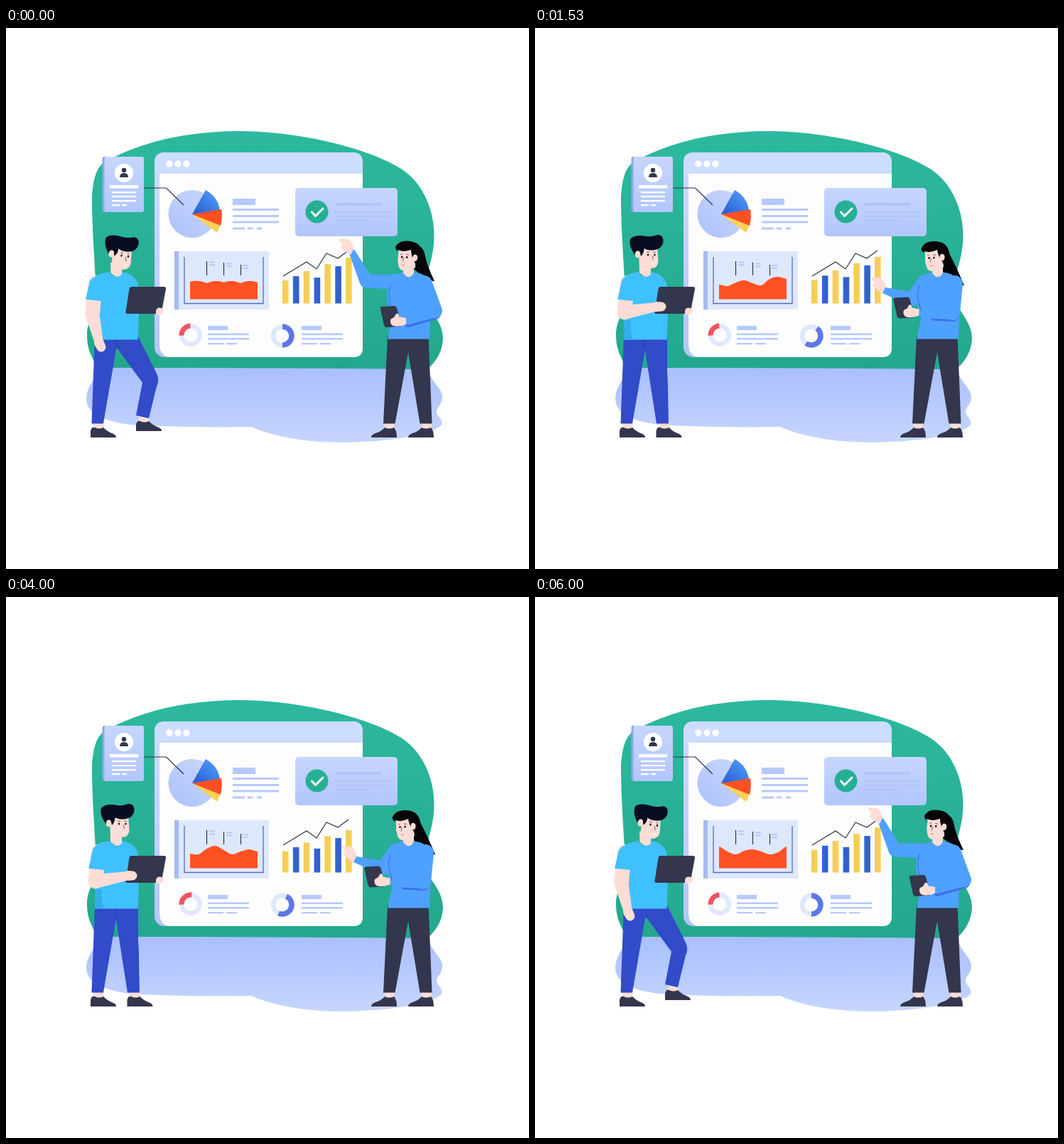
Recreate the animation shown at these times as an HTML page. Size 736 by 761 pixels, loop 6.03 s.

```html
<!DOCTYPE html>
<html lang="en">
<head>
<meta charset="utf-8">
<title>Dashboard presentation</title>
<style>
html, body { margin: 0; width: 100%; height: 100%; overflow: hidden; background: #fff; }
svg { display: block; width: 100%; height: 100%; }
.skin { fill: #fdddd6; }
.dark { fill: #33364c; }
.hair { fill: #080c20; }
.black { fill: #050507; }
.tee { fill: #40c1ff; }
.top { fill: #4fa1ff; }
.shade { fill: #3c72ee; }
.jeans { fill: #314bc9; }
.text { fill: #b7c9fd; }
.ink { fill: none; stroke: #2f3248; stroke-width: 1.2; }
.fine { fill: none; stroke: #2f3248; stroke-width: .7; }
</style>
</head>
<body>
<svg viewBox="0 0 736 761" xmlns="http://www.w3.org/2000/svg">
<defs>
  <linearGradient id="green" x2="0" y2="1"><stop stop-color="#2db99e"/><stop offset="1" stop-color="#23a88d"/></linearGradient>
  <linearGradient id="floor" x2="0" y2="1"><stop stop-color="#a9bffd"/><stop offset="1" stop-color="#c6d6ff"/></linearGradient>
  <linearGradient id="card" x2="0" y2="1"><stop stop-color="#c6d6ff"/><stop offset="1" stop-color="#b2c6fc"/></linearGradient>
  <linearGradient id="pie" y1="1" x2="1" y2="0"><stop stop-color="#acc1fa"/><stop offset="1" stop-color="#c9d8ff"/></linearGradient>
  <linearGradient id="wedge" x1="1" x2="0" y2="1"><stop stop-color="#55a6ff"/><stop offset="1" stop-color="#2558cf"/></linearGradient>
  <linearGradient id="gold" x2="1" y2="0"><stop stop-color="#f5cb52"/><stop offset="1" stop-color="#f7d25e"/></linearGradient>
  <linearGradient id="blue" x2="1" y2="0"><stop stop-color="#3465d4"/><stop offset="1" stop-color="#2f5ecb"/></linearGradient>
  <linearGradient id="side" x2="0" y2="1"><stop stop-color="#cdddff"/><stop offset="1" stop-color="#b3c6f8"/></linearGradient>
  <path id="shoe" d="M119 576V567Q120 561 125 562Q131 565 137 562Q143 568 150 570.500Q155 572 155 576Z"/>
  <path id="pump" d="M514 576Q514 572 520 570Q529 567 533 562Q539 565 546 562Q550 566 550 576Z"/>
</defs>

<path fill="url(#green)" d="M121 240C122 212 128 194 140 188C190 160 255 145 330 145C412 146 505 167 556 198C590 220 602.500 260 602.500 292C602.500 325 591 340 590 372C590 396 614 408 615 436C614 458 604 470 592 481H130C122 464 114 454 114 432C114 410 126 402 127 380C126 340 121 290 121 240Z"/>
<path fill="url(#floor)" d="M130 478Q360 477.500 594 480C599 500 614 506 614 520C613 532 605 534 606 541C608 548 615 550 613 558C604 571 540 583 470 583C420 582 380 576 345 561C290 562 220 561 175 558C145 554 113 546 113 521C114 502 126 496 130 478Z"/>

<rect x="209" y="175" width="293" height="288" rx="14" fill="url(#side)"/>
<path fill="#fdfdfe" d="M216 190H502V450Q502 463 489 463H230Q216 461 216 444Z"/>
<path fill="#cdddff" d="M209 205V189Q209 175 223 175H488Q502 175 502 189V205Z"/>
<g fill="#fff"><circle cx="230" cy="191" r="4.7"/><circle cx="242" cy="191" r="4.7"/><circle cx="254" cy="191" r="4.7"/></g>

<rect x="135.500" y="181" width="20" height="78" rx="3" fill="#8ea7ea"/>
<rect x="138.500" y="181" width="55.500" height="78" rx="3" fill="url(#card)"/>
<g fill="#fff">
  <circle cx="166" cy="204" r="13"/>
  <path d="M146 221H186V225.500H146ZM149 230H183V232.200H149ZM149 236H183V238.200H149ZM149 242H183V244.200H149ZM149 248H160V250.200H149ZM163 248H170V250.200H163Z"/>
</g>
<circle class="dark" cx="166" cy="200" r="3.2"/>
<path class="dark" d="M160 210Q160 204 166 204T172 210Z"/>

<circle cx="262" cy="261.500" r="33.500" fill="url(#pie)"/>
<path fill="url(#wedge)" d="M262 262L281 228Q299 238 301 257Z"/>
<path fill="#ffd157" d="M262 262L302 277L297 288Z"/>
<path fill="#ff5023" d="M262 262L303 255Q305 267 302 278Z"/>
<path class="ink" d="M194 225H225.500L250 249"/>
<path class="text" d="M319 240H351V249H319ZM319 254H384V257H319ZM319 263H384V266H319ZM319 271.500H384V274.500H319ZM319 280.500H336V283.500H319ZM340 280.500H347V283.500H340ZM353 280.500H360V283.500H353Z"/>

<rect x="407" y="225" width="144" height="68" rx="5" fill="url(#card)"/>
<circle cx="437.500" cy="258.500" r="16" fill="#25b094"/>
<path d="M430.500 259L435.500 264.500L446 254" fill="none" stroke="#fff" stroke-width="3" stroke-linecap="round" stroke-linejoin="round"/>
<path fill="#b1c4fa" d="M463 246H528V250H463ZM463 258H541V260H463ZM463 264H541V266H463ZM463 270H511V272H463Z"/>

<rect x="237" y="314" width="133" height="82" fill="#a5baf2"/>
<rect x="243" y="314" width="127" height="82" fill="#dee8fd"/>
<path fill="none" stroke="#536dbd" stroke-width="1.3" d="M251 322V387.500H362V322"/>
<path class="ink" d="M282.500 328V348M306.500 330V348M330.500 333V348"/>
<path class="text" d="M286 328.500H294V330.500H286ZM286 332.500H294V334.500H286ZM310 330.500H318V332.500H310ZM310 334.500H318V336.500H310ZM333 333H341V335H333ZM333 337H341V339H333Z"/>
<path id="wave" fill="#ff5122"/>

<g id="bars"></g>
<path class="ink" d="M390 349L423 329L437 339L451 317L467 324L482 313"/>

<g fill="none" stroke-width="7">
  <circle cx="260" cy="432" r="12.800" stroke="#e0e9fa" stroke-width="6.500"/>
  <path id="arcRed" stroke="#f2535f"/>
  <circle cx="389" cy="433" r="13" stroke="#dde8fa" stroke-width="6.500"/>
  <path id="arcBlue" stroke="#5d78e4" stroke-width="7.500"/>
</g>
<g class="text"><path id="rows" d="M284 419H312V425H284ZM284 429.500H342V432H284ZM284 436H342V438.500H284ZM284 443H306V445.300H284ZM310 443H325V445.300H310Z"/><use href="#rows" x="132"/></g>

<!-- man -->
<path class="skin" d="M123 553H137L138 565H123Z"/>
<use href="#shoe" class="dark"/>
<g id="foot"><path class="skin" d="M123 551H137L138 565H123Z"/><use href="#shoe" class="dark"/></g>
<path id="leg" class="jeans"/>
<path class="jeans" d="M125 433H166L155 452L137 556.500H120.500Z"/>
<path id="crease" fill="none" stroke="#2639a8" stroke-width="1"/>
<path id="shirt" class="tee"/>
<path id="fold" fill="#32aee9" d="M125 409L135 412Q133 426 138 437.500H125Z"/>
<path class="skin" d="M147 330H163V346Q157 354 148 345Z"/>
<g id="manHead">
  <path class="skin" d="M146 306H172L173.500 328Q173 338 163 338L161 345H147Z"/>
  <path class="hair" d="M141 320Q131 306 134 297Q140 290 157 293Q164 294 172 291Q181 290 180.500 301Q179 311 167 312.500Q158 313 153.500 310Q153.500 317 149 321L147 314Q142 312 141 320Z"/>
  <ellipse class="skin" cx="144.500" cy="318.500" rx="3.800" ry="5"/>
  <g id="manEyes" class="hair"><ellipse cx="159" cy="319" rx="1.200" ry="1.600"/><ellipse cx="168.500" cy="319" rx="1.200" ry="1.600"/></g>
  <path class="fine" d="M157 315.500L161 315M166.500 315L170 315.500M165 320L166.500 326"/>
  <path d="M163 330.500Q167 332 169 330Q167 335 163 330.500Z" fill="#fff"/>
</g>
<path class="dark" d="M177 364H222Q225.500 364 225 367L219 399Q218.500 402 215 402H171Q168 402 168.500 399L173.500 367Q174 364 177 364Z"/>
<path class="skin" d="M211 398Q212 392 219 394Q223 397 221 401Q215 405 211 402Z"/>
<path id="manArm" class="skin"/>
<path id="manHand" class="skin"/>
<path id="sleeve" class="tee"/>

<!-- woman -->
<path class="skin" d="M533 553H546V565H533ZM585 553H599V565H585Z"/>
<use href="#pump" class="dark"/><use href="#pump" class="dark" x="52"/>
<path class="dark" d="M537 433H594.500L599.500 556.500H582.500L566 456L547.500 556.500H531Z"/>
<path id="tail" class="black"/>
<path id="reach" class="top"/>
<path class="top" d="M548 347Q559 343 565 344L576 344Q592 345 596 360L597 400L596 437.500H537Q541 418 544 407Q536 390 536 378Q538 355 548 347Z"/>
<path fill="none" stroke="#3c72ee" stroke-width="1.300" d="M541 362Q537 375 540 386L545 405"/>
<path class="skin" d="M560 332H574V344Q568 356 559 345Z"/>
<g id="point"><path class="skin" d="M3 -6L-2 -15Q-6 -20 -11 -18L-16 -19Q-20 -18 -17 -15L-13 -11Q-18 -8 -14 -4L-6 2L-2 4Z"/></g>
<g id="womanHead">
  <path class="skin" d="M549 311H573L575 336L565 342Q553 344 551 336L549 328Z"/>
  <path class="black" d="M543.500 311Q547 300 562 300Q580 300 583 316L585 338L576 340Q576 332 572 327Q567 320 566 312Q556 317 548 314L546 316Z"/>
  <ellipse class="skin" cx="573" cy="322.500" rx="3.600" ry="4.800"/>
  <g class="black"><ellipse cx="554.500" cy="323.500" rx="1.200" ry="1.600"/><ellipse cx="561.500" cy="323" rx="1.200" ry="1.600"/></g>
  <path class="fine" d="M552 320L555 319M560 319L564 319.500M557.500 324L556 329.500"/>
  <path d="M555 334Q557 335 560 333Q558 337 555 334Z" fill="#f0606a"/>
</g>
<path id="foreShade" class="shade"/>
<path id="upper" class="top"/>
<path id="fore" class="top"/>
<g id="phone">
  <path class="dark" d="M529 392L546 391Q549 391 550 394L556 416Q556 420 553 420L536 421Q533 421 532 418L527 395Q526.500 392 529 392Z"/>
  <path class="skin" d="M541 413Q540 409 546 407L549 402Q553 401 553 406L563 408V417Q552 421 545 419Q541 417 541 413Z"/>
</g>
</svg>
<script>
const LOOP = 6030;
const $ = id => document.getElementById(id);
const set = (id, name, value) => $(id).setAttribute(name, value);
const mix = (a, b, k) => a + (b - a) * k;
const mixPt = (a, b, k) => a.map((v, i) => mix(v, b[i], k));
const clamp = v => Math.min(1, Math.max(0, v));
const ease = v => (v = clamp(v), v * v * (3 - 2 * v));

// Chart values at shared times, eased in between.
const times = [0, 700, 1530, 2530, 4000, 4800, 6000];
const barTop = [323.2, 322.6, 321.8, 326, 328, 324.4, 324.4];
const turn = [0, 56, 36, 28, 25, 12, 0];
const redEnd = [-3, 6, -3, 6, 6, 5, -3];
const scallop = [3, 0.5, 0, 5, 0, 3, 0];
const crest = [
  [357, 359, 359, 359, 358, 359, 359, 359, 358],
  [355, 355, 359, 362, 357, 358, 361, 354, 352],
  [361, 363, 358, 355, 359, 362, 353, 350, 353],
  [361, 359, 357, 357, 356, 357, 358, 360, 360],
  [361, 362, 354, 350, 356, 362, 358, 355, 358],
  [357, 355, 358, 360, 358, 360, 359, 360, 358],
  [351, 358, 362, 357, 355, 358, 362, 359, 351]
];

function track(values, t) {
  let i = times.length - 2;
  while (i && t < times[i]) i--;
  return mix(values[i], values[i + 1], ease((t - times[i]) / (times[i + 1] - times[i])));
}

const barEdges = [355, 349, 342, 351, 332, 335, 323];
$('bars').innerHTML = barEdges.map((y, i) =>
  `<rect x="${389 + i * 14.85}" y="${y}" width="8.6" height="${387.5 - y}" fill="url(#${i % 2 ? 'blue' : 'gold'})"/>`).join('');

// Catmull-Rom value at position u along evenly spaced points.
function spline(p, u) {
  const i = Math.min(p.length - 2, Math.floor(u)), f = u - i;
  const a = p[Math.max(0, i - 1)], b = p[i], c = p[i + 1], d = p[Math.min(p.length - 1, i + 2)];
  return b + f / 2 * (c - a + f * (2 * a - 5 * b + 4 * c - d + f * (3 * (b - c) + d - a)));
}

function wavePath(t) {
  const rows = crest[0].map((_, i) => track(crest.map(c => c[i]), t));
  const bump = track(scallop, t);
  let d = 'M259 381.5';
  for (let x = 0; x <= 95; x++) {
    const y = spline(rows, x / 95 * 8) - bump * Math.abs(Math.sin(Math.PI * x / 23.75));
    d += `L${259 + x} ${y.toFixed(2)}`;
  }
  return d + 'V381.5Z';
}

function arc(cx, cy, r, from, to) {
  const at = a => `${cx + r * Math.sin(a * Math.PI / 180)} ${cy - r * Math.cos(a * Math.PI / 180)}`;
  return `M${at(from)}A${r} ${r} 0 ${to - from > 180 ? 1 : 0} 1 ${at(to)}`;
}

// Tapered limb with round ends.
function limb(a, b, wa, wb) {
  const dx = b[0] - a[0], dy = b[1] - a[1], len = Math.hypot(dx, dy);
  const nx = -dy / len / 2, ny = dx / len / 2;
  const side = (p, w) => `${p[0] + nx * w} ${p[1] + ny * w}`;
  return `M${side(a, wa)}L${side(b, wb)}A${wb / 2} ${wb / 2} 0 0 0 ${side(b, -wb)}L${side(a, -wa)}A${wa / 2} ${wa / 2} 0 0 0 ${side(a, wa)}Z`;
}

function drawMan(k, swing, t) {
  const p = (ax, ay, bx, by) => mixPt([ax, ay], [bx, by], k).join(' ');
  set('leg', 'd', `M150 434L186 434L${p(211, 484, 186, 484)}Q${p(217, 494, 187, 495)} ${p(212, 504, 187, 505)}L${p(201, 549, 188, 556.5)}L${p(183, 545, 171, 556.5)}L${p(192, 499, 162, 499)}L154 447Z`);
  set('crease', 'd', `M155 438L${p(158, 451, 154, 452)}`);
  set('foot', 'transform', `translate(${mix(64, 51.5, k)} ${mix(-9, 0, k)})`);
  set('shirt', 'd', `M145 343Q154 356 164 343Q180 346 185 359L188 376L185.500 438.500H${mix(132, 125, k)}L${mix(132, 129, k)} 385L121 354Q130 345 145 343Z`);
  set('fold', 'opacity', k);
  set('manHead', 'transform', `rotate(${mix(8, 0, k)} 153 345)`);

  const blink = [300, 2300, 4300].reduce((v, c) => Math.max(v, 1 - Math.abs(t - c) / 100), 0);
  set('manEyes', 'transform', `translate(0 319) scale(1 ${1 - 0.85 * ease(blink)}) translate(0 -319)`);

  const shoulder = [mix(126, 130, k) - swing * 2, 358];
  const elbow = mixPt([121.5, 402], [126, 400], k);
  elbow[0] -= swing * 10; elbow[1] -= swing * 3;
  const hand = mixPt([131, 443], [172, 392], k);
  set('manArm', 'd', limb(shoulder, elbow, 20, 21) + limb(elbow, hand, 20, 12));
  const tip = mixPt([134, 449], [178, 392], k);
  set('manHand', 'd', limb(hand, tip, 14, 13));

  const dx = elbow[0] - shoulder[0], dy = elbow[1] - shoulder[1], len = Math.hypot(dx, dy);
  const ux = dx / len, uy = dy / len;
  const cuff = [shoulder[0] + ux * 25, shoulder[1] + uy * 25];
  const a = [cuff[0] + uy * 11.5, cuff[1] - ux * 11.5], b = [cuff[0] - uy * 11.5, cuff[1] + ux * 11.5];
  set('sleeve', 'd', `M143 344Q126 346 ${shoulder[0] - 8} 356L${b}L${a}L146 364Z`);
}

function drawWoman(k, swing) {
  const elbow = mixPt([507, 356], [531, 381], k);
  elbow[1] += swing * 8;
  const wrist = mixPt([487, 315], [491, 369], k);
  wrist[1] += swing * 4;
  set('reach', 'd', limb([549, 357], elbow, 21, 19) + limb(elbow, wrist, 19, 9));
  set('point', 'transform', `translate(${wrist})`);
  set('womanHead', 'transform', `rotate(${mix(7, 0, k)} 567 345)`);

  const tip = mixPt([603, 356], [604, 362], k);
  set('tail', 'd', `M565 304Q${mix(586, 580, k)} 303 ${mix(589, 583, k)} 317Q592 334 ${tip}Q${mix(594, 593, k)} ${mix(357, 363, k)} ${mix(580, 579, k)} ${mix(344, 350, k)}L570 336Z`);

  const joint = mixPt([604, 398], [588, 401], k);
  const hold = mixPt([566, 411], [547, 402], k);
  const top = [mix(588, 590, k), 360];
  const low = p => [p[0], p[1] + 4];
  set('foreShade', 'd', limb(low(joint), low(mixPt(hold, joint, k * 0.35)), 16, 12));
  set('upper', 'd', limb(top, joint, 24, 20));
  set('fore', 'd', limb(joint, hold, 18, 12));
  set('phone', 'transform', `translate(${mix(0, -22.5, k)} ${mix(0, -12.5, k)})`);
}

function frame(now) {
  const t = now % LOOP;
  set('wave', 'd', wavePath(t));
  set('bars', 'transform', `translate(0 387.5) scale(1 ${(387.5 - track(barTop, t)) / 64.5}) translate(0 -387.5)`);
  set('arcRed', 'd', arc(260, 432, 13, -93, track(redEnd, t)));
  const spin = track(turn, t);
  set('arcBlue', 'd', arc(389, 433, 13, spin, spin + 180));

  const k = ease((t - 700) / 800) - ease((t - 4350) / 900);
  const swing = Math.sin(Math.PI * k);
  drawMan(k, swing, t);
  drawWoman(k, swing);
  requestAnimationFrame(() => frame(performance.now()));
}
frame(performance.now());
</script>
</body>
</html>
```
